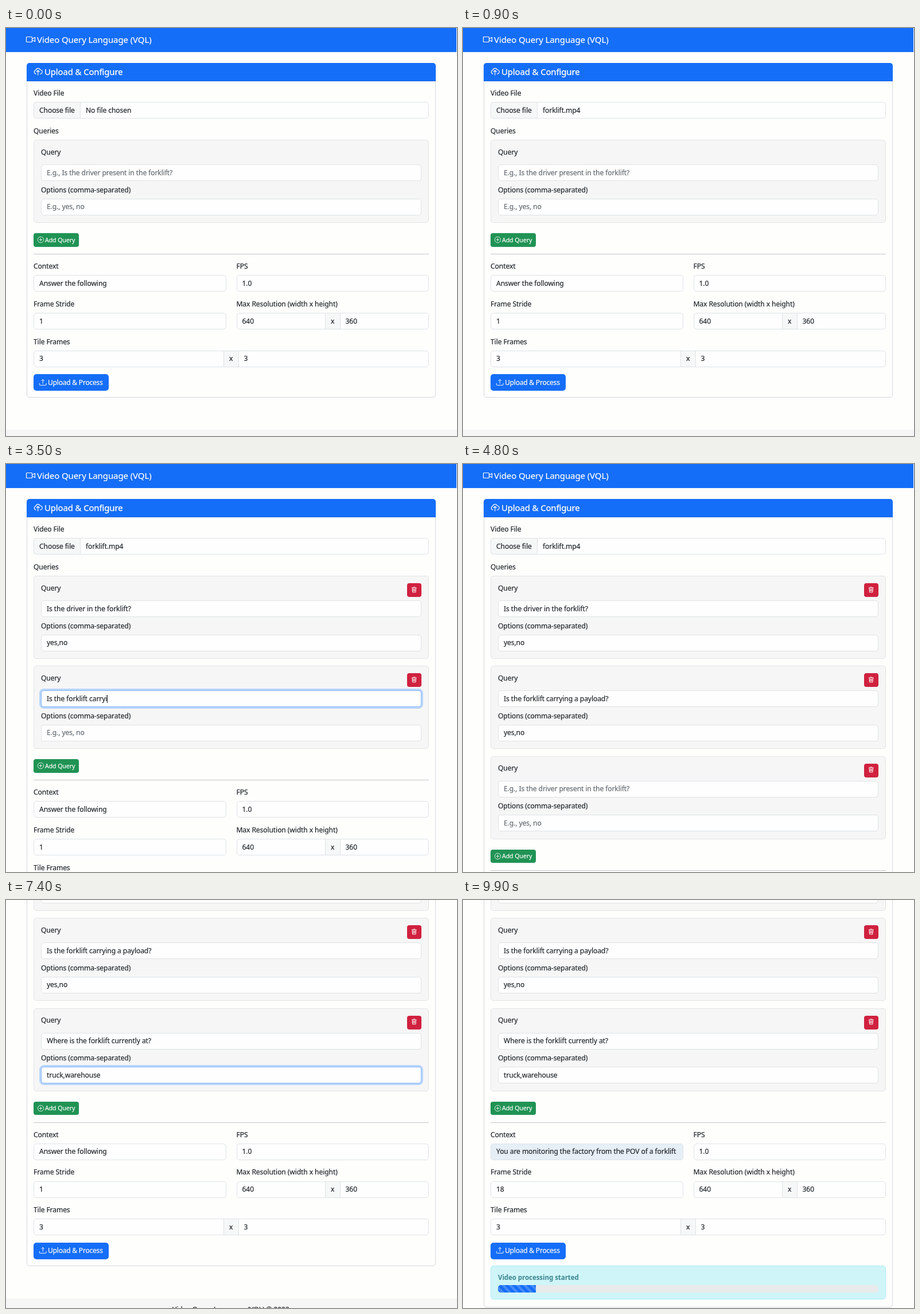
Write an HTML page that moves like this. It is 786x712 px and loops after 10 s.

```html
<!DOCTYPE html>
<html lang="en">
<head>
<meta charset="utf-8">
<title>Video Query Language</title>
<style>
html, body { margin: 0; width: 100%; height: 100%; overflow: hidden; background: #fefefd; }
#stage { position: relative; width: 786px; height: 712px; overflow: hidden;
  font: 12.1px/20px "Noto Sans", sans-serif; letter-spacing: -.1px; color: #212529;
  -webkit-text-stroke: .18px; }
#stage * { position: absolute; box-sizing: border-box; white-space: pre; }
#page, #rest, #dialog { left: 0; top: 0; width: 786px; }
svg { fill: none; stroke: currentColor; overflow: visible; }
.bar { background: #156ef8; }
.card { border: 1px solid #d6d8da; border-radius: 5px; }
.cardhead { border-radius: 5px 5px 0 0; border-bottom: 1px solid #1765dc; }
.white { color: #fff; }
.brand { font-size: 15px; }
.title { font-size: 14.9px; font-weight: 500; -webkit-text-stroke: .3px; }
.group { background: #f6f6f6; border: 1px solid #e3e4e5; border-radius: 5px; }
.field { background: #fefefe; border: 1px solid #dfe2e6; border-radius: 5px; }
.field > span { left: 9px; top: 50%; margin-top: -10px; }
.field > i { display: none; top: 7px; width: 1px; height: 14px; background: #212529; }
.field.focus { border-color: #86b7fe; box-shadow: 0 0 0 3px #b9d5fb; }
.field.empty > span { color: #646a70; }
.field.auto { background: #e6eef6; }
.left { border-radius: 5px 0 0 5px; }
.right { border-radius: 0 5px 5px 0; }
.addon { background: #f6f7f7; border: 1px solid #dfe2e6; }
.green { background: #209354; border-radius: 4px; }
.red { background: #d0213f; border-radius: 4px; }
.blue { background: #156ef8; border-radius: 5px; }
.small { font-size: 10.6px; }
.tight { letter-spacing: -.25px; }
.rule { background: #c6c7c8; }
.foot { background: #f5f6f5; }
.alert { background: #cff5f8; border: 1px solid #aeecf3; border-radius: 5px; }
.alert-text { color: #3d868f; font-weight: 700; font-size: 11.6px; -webkit-text-stroke: 0; }
.track { background: #e8eaeb; border-radius: 5px; overflow: hidden; }
.fill { left: 0; top: 0; height: 100%; background: #156ef8
  linear-gradient(45deg, #fff3 25%, #0000 25% 50%, #fff3 50% 75%, #0000 75%) 0 0 / 12.6px 12.6px; }
.shade { background: rgba(0, 0, 0, .3); }
.window { background: #f5f4f2; border-radius: 9px 0 0 9px; box-shadow: 0 1px 5px rgba(0, 0, 0, .25); }
.side { background: #fafaf9; border: solid #dddcda; border-width: 1px 0; }
.list { background: #fff; border: 1px solid #e59a7c; }
.cancel { background: #dddbd8; border-radius: 5px; }
.recent { background: #ebeae8; border-radius: 4px; }
.thumb { background: #c4c3c1; border-radius: 1px; }
.picked { background: #e5e5e4; }
.check { background: #fff; border: 1px solid #cfccc8; border-radius: 4px; }
.ui { font-size: 11.1px; }
.entry { font-size: 11.3px; color: #111; }
.bold { font-size: 11.1px; font-weight: 700; letter-spacing: 0; -webkit-text-stroke: 0; }
.column { font-size: 8.8px; font-weight: 700; letter-spacing: 0; color: #92918f; -webkit-text-stroke: 0; }
.grey { color: #4a4a4a; }
.media { background: #2b2b30; border-radius: 2px; }
.media::after { content: ""; position: absolute; left: 4px; top: 3px;
  border: solid transparent; border-width: 2.5px 0 2.5px 5px; border-left-color: #fff; }
.folder { background: #77757a; border-top: 3px solid #d1574a; border-radius: 2px; }
</style>
</head>
<body>
<div id="stage"></div>
<script>
const PITCH = 157.25, SCROLL = 321, LOOP = 10000;
const stage = document.getElementById('stage');

function add(parent, cls, x, y, w, h) {
  const el = document.createElement('div');
  el.className = cls;
  if (w) el.style.cssText = `left:${x}px;top:${y}px;width:${w}px;height:${h}px`;
  parent.append(el);
  return el;
}
function text(parent, x, mid, str, cls = '') {
  const el = document.createElement('span');
  el.className = cls;
  el.style.cssText = `left:${x}px;top:${mid - 10}px`;
  el.textContent = str;
  parent.append(el);
  return el;
}
function icon(parent, x, y, size, d, cls = 'white', weight = 1.2) {
  parent.insertAdjacentHTML('beforeend',
    `<svg class="${cls}" viewBox="0 0 16 16" width="${size}" height="${size}" stroke-width="${weight}"
      style="left:${x}px;top:${y}px"><path d="${d}"/></svg>`);
}
function field(parent, x, y, w, value = '', hint = '', cls = '') {
  const el = add(parent, 'field ' + cls, x, y, w, 29);
  const span = el.appendChild(document.createElement('span'));
  const caret = el.appendChild(document.createElement('i'));
  let shown;
  const set = (val, focus = false, blink = false) => {
    const key = val + focus + blink;
    if (key === shown) return;
    shown = key;
    span.textContent = val || hint;
    el.classList.toggle('empty', !val);
    el.classList.toggle('focus', focus);
    caret.style.display = blink ? 'block' : 'none';
    if (blink) caret.style.left = 9 + (val ? span.offsetWidth : 0) + 'px';
  };
  set(value);
  return { el, set };
}
function layer(parent, id) {
  const el = add(parent, '');
  el.id = id;
  return el;
}

// Page
const page = layer(stage, 'page');
const card = add(page, 'card', 35.5, 61, 713.5, 584);
add(page, 'bar', 0, 0, 785, 42);
icon(page, 35, 12, 16, 'M1.5 3.5h8a1 1 0 0 1 1 1v7a1 1 0 0 1-1 1h-8a1 1 0 0 1-1-1v-7a1 1 0 0 1 1-1zM10.5 7l5-2.5v7L10.5 9');
text(page, 54, 20, 'Video Query Language (VQL)', 'white brand');
add(page, 'bar cardhead', 35.5, 61, 713.5, 31.5);
icon(page, 48, 68, 15.5, 'M8 15V6M5 9l3-3 3 3M4.5 12.5H4a3.5 3.5 0 0 1 0-6.8a4.2 4.2 0 0 1 8-.5a3.5 3.5 0 0 1 0 7.3h-.5');
text(page, 67, 75.5, 'Upload & Configure', 'white title');
text(page, 48, 113.5, 'Video File');
add(page, 'field', 48, 129, 689, 29);
const choose = add(page, 'addon left', 48, 129, 82, 29);
text(page, 58, 143.5, 'Choose file');
const fileName = text(page, 139, 143.5, '');
text(page, 48, 179.5, 'Queries');

const queries = [0, 1, 2].map(i => {
  const el = add(page, '', 0, i * PITCH, 786, 1);
  add(el, 'group', 48, 195, 689, 145);
  text(el, 61, 216.5, 'Query');
  text(el, 61, 282.5, 'Options (comma-separated)');
  const trash = add(el, 'red', 699, 208, 24.5, 24);
  icon(trash, 7, 5.5, 10.5, 'M1.5 3h13M5.5 2.5v-1h5v1M3 3l.8 12h8.4L13 3M5.5 5.5v7M8 5.5v7M10.5 5.5v7', 'white', 1.4);
  return {
    el, trash,
    ask: field(el, 61, 238, 662.5, '', 'E.g., Is the driver present in the forklift?'),
    opts: field(el, 61, 297.5, 662.5, '', 'E.g., yes, no')
  };
});

const rest = layer(page, 'rest');
add(rest, 'green', 48, 358, 79, 23.5);
icon(rest, 55, 364, 11, 'M8 .5a7.5 7.5 0 1 0 .01 0zM8 4v8M4 8h8');
text(rest, 68, 369.5, 'Add Query', 'white small');
add(rest, 'rule', 48, 394, 688.5, 1);
text(rest, 48, 416, 'Context');
text(rest, 401.5, 416, 'FPS');
text(rest, 48, 481.5, 'Frame Stride');
text(rest, 401.5, 481.5, 'Max Resolution (width x height)');
text(rest, 48, 547.5, 'Tile Frames');
const context = field(rest, 48, 431, 335.5);
field(rest, 401.5, 431, 335.5, '1.0');
const stride = field(rest, 48, 497, 335.5);
field(rest, 401.5, 497, 155, '640', '', 'left');
field(rest, 581.5, 497, 155.5, '360', '', 'right');
add(rest, 'addon', 555.5, 497, 27, 29);
text(rest, 566, 511.5, 'x');
field(rest, 48, 562.5, 332, '3', '', 'left');
field(rest, 404.5, 562.5, 332.5, '3', '', 'right');
add(rest, 'addon', 379, 562.5, 26.5, 29);
text(rest, 389, 577, 'x');
add(rest, 'blue', 48, 604, 131, 29);
icon(rest, 58, 611.5, 12.5, 'M.5 10v3.5a1 1 0 0 0 1 1h13a1 1 0 0 0 1-1V10M8 11V2M4.5 5 8 1.5 11.5 5');
text(rest, 73, 618.5, 'Upload & Process', 'white tight');
const foot = add(rest, 'foot', 0, 701, 786, 60);
text(foot, 290, 20.5, 'Video Query Language (VQL) © 2023');
const alertBox = add(rest, 'alert', 48, 644.5, 689, 59);
text(alertBox, 12, 19.5, 'Video processing started', 'alert-text');
const track = add(alertBox, 'track', 12, 32.5, 662.5, 13);
const fill = add(track, 'fill');

// File chooser
const dialog = layer(stage, 'dialog');
add(dialog, 'shade', 0, 0, 786, 712);
add(dialog, 'window', 378.5, 192, 420, 285);
add(dialog, 'cancel', 383, 196, 63, 26);
text(dialog, 396, 209, 'Cancel', 'bold');
text(dialog, 679, 209, 'Open File', 'bold');
add(dialog, 'side', 378.5, 227, 420, 214);
add(dialog, 'recent', 383, 232, 123.5, 27.5);
add(dialog, 'thumb', 506.5, 233, 2, 135);
[
  ['Recent', 'M8 1a7 7 0 1 0 .01 0zM8 4v4.5l3 1.5'],
  ['Home', 'M1 8.5 8 2l7 6.5M3 7.5V15h3.5v-5h3v5H13V7.5'],
  ['Documents', 'M2.5 1h8l3 3v11h-11zM5 6h6M5 9h6M5 12h6'],
  ['Downloads', 'M6 1h4v6h2.5L8 11.5 3.5 7H6zM5 14.5h6'],
  ['Music', 'M5.5 12V2.5l8-1.5v10M5.5 12a2 2 0 1 1-4 1a2 2 0 0 1 4-1M13.5 11a2 2 0 1 1-4 1a2 2 0 0 1 4-1'],
  ['Pictures', 'M1 2.5h14v11H1zM3 11.5l3-4 2.5 2.5 2-2 2.5 3.5zM11 5.5h1'],
  ['Videos', 'M2 1.5h12v13H2zM4.5 1.5v13M11.5 1.5v13M4.5 8h7M2 5h2.5M2 11h2.5M11.5 5H14M11.5 11H14']
].forEach(([name, d], i) => {
  icon(dialog, 394, 240 + i * 29, 12, d, 'grey', 1.3);
  text(dialog, 412, 245.5 + i * 29, name, 'ui');
});
add(dialog, 'list', 511.5, 227.5, 300, 213);
text(dialog, 514.5, 238.5, 'Name', 'column');
text(dialog, 707.5, 238.5, 'Location', 'column');
const picked = add(dialog, 'picked', 512.5, 284.5, 290, 17);
[
  ['forklift_mini.mp4', 'Projects/perception'],
  ['Screencast from 17-04-25 09:3…', 'Videos/Screencasts'],
  ['forklift.mp4', 'Projects/perception'],
  ['video.mp4', 'Downloads'],
  ['forklift', 'Projects/perception']
].forEach(([name, place], i) => {
  const mid = 259 + i * 16.8;
  add(dialog, i < 4 ? 'media' : 'folder', 517.5, mid - 5.5, 12, 11);
  text(dialog, 535.5, mid, name, 'entry');
  text(dialog, 709.5, mid, place, 'entry');
});
add(dialog, 'check', 386.5, 452, 14.5, 15);
text(dialog, 404.5, 459, 'Open files read-only', 'ui');

// Typed fields: focus from, typing from, ms per letter, focus until
const typing = [
  [queries[0].ask, 'Is the driver in the forklift?', 1000, 1100, 23, 1900],
  [queries[0].opts, 'yes,no', 1900, 2000, 20, 2600],
  [queries[1].ask, 'Is the forklift carrying a payload?', 2800, 2900, 27, 4000],
  [queries[1].opts, 'yes,no', 4000, 4100, 40, 4700],
  [queries[2].ask, 'Where is the forklift currently at?', 5100, 5200, 28, 6300],
  [queries[2].opts, 'truck,warehouse', 6300, 6400, 40, 7700]
];

const show = (el, on) => { el.style.visibility = on ? 'visible' : 'hidden'; };
const within = (t, a, b) => t >= a && t < b;
const ramp = (t, a, b) => Math.min(1, Math.max(0, (t - a) / (b - a)));

function draw(now) {
  const t = Math.floor(now % LOOP / 100) * 100;
  const count = t < 2600 ? 1 : t < 4700 ? 2 : 3;
  const sent = t >= 9300;
  const shift = (count - 1) * PITCH, extra = sent ? 72 : 0;

  page.style.top = -Math.round(SCROLL * ramp(t, 7000, 7300)) + 'px';
  rest.style.top = shift + 'px';
  card.style.height = 584 + shift + extra + 'px';
  foot.style.top = 701 + extra + 'px';
  queries.forEach((q, i) => {
    q.el.style.display = i < count ? '' : 'none';
    q.trash.style.display = count > 1 ? '' : 'none';
  });

  const open = within(t, 300, 800);
  show(dialog, open);
  picked.style.display = t >= 400 ? '' : 'none';
  choose.style.background = open ? '#e3e6e8' : '';
  fileName.textContent = t < 800 ? 'No file chosen' : 'forklift.mp4';

  for (const [box, str, from, start, rate, until] of typing) {
    const n = Math.max(0, Math.floor((t - start) / rate));
    const focus = within(t, from, until);
    box.set(str.slice(0, n), focus, focus && t < start + rate * str.length + 300);
  }

  const auto = t >= 8300;
  context.set(auto ? 'You are monitoring the factory from the POV of a forklift'
    : t < 7900 ? 'Answer the following' : 'You'.slice(0, (t - 7800) / 100),
    within(t, 7700, 8600), within(t, 7700, 8300));
  context.el.classList.toggle('auto', auto);
  stride.set(t < 8800 ? '1' : '18', within(t, 8600, 9200), within(t, 8600, 9100));

  alertBox.style.display = sent ? '' : 'none';
  fill.style.width = 10 * ramp(t, 9300, 9700) + '%';
  fill.style.backgroundPositionX = -(t - 9300) / 1000 * 12.6 + 'px';
}

function tick() {
  draw(performance.now());
  requestAnimationFrame(tick);
}
tick();
</script>
</body>
</html>
```
